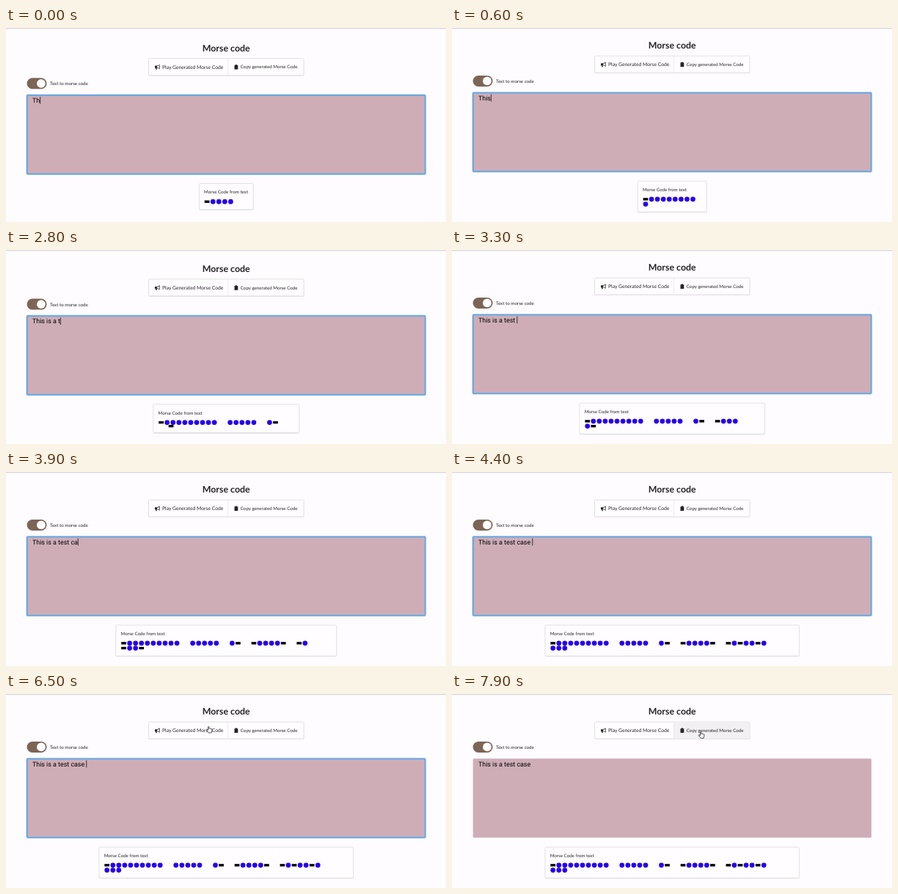
These frames come from a looping animation (600 by 265 pixels, 8 s). An HTML page:

```html
<!DOCTYPE html>
<html lang="en">
<head>
<meta charset="utf-8">
<title>Morse code</title>
<style>
  html, body { margin: 0; width: 100%; height: 100%; overflow: hidden; background: #fefcfe; }
  svg { display: block; width: 600px; height: 265px; }
  text { font: 6.2px Lato, sans-serif; fill: #262326; text-rendering: geometricPrecision; white-space: pre; }
  .title { font-size: 12.4px; font-weight: 700; text-anchor: middle; }
  .play { font-size: 6.77px; }
  #typed { font: 8.9px Roboto, sans-serif; fill: #000; }
  .box { fill: #fffdff; stroke: #dddbdd; stroke-width: .8; }
  .shadow { fill: #d3d1d3; opacity: .6; }
</style>
</head>
<body>
<svg viewBox="0 0 600 265">
  <rect width="600" height="1.3" fill="#d9d7d9"/>
  <g id="page">
    <text class="title" x="300.2" y="31.8">Morse code</text>

    <rect class="shadow" x="194.3" y="42" width="212" height="23.4" rx="1.5"/>
    <rect class="box" x="194.5" y="41.5" width="211.5" height="23" rx="1.4"/>
    <rect id="pressed" x="302.8" y="41.9" width="102.8" height="22.2" fill="#f2f0f2"/>
    <path d="M302.6 41.9v22.2" stroke="#e4e2e4" stroke-width=".7"/>
    <g fill="#262326">
      <path d="M203 51.6h2.6q2.4-.2 4-1.9v6.6q-1.600-1.700-4-1.900h-.3l.7 2.300h-1.500l-.8-2.300h-.7z"/>
      <path d="M206 52.300q1.600-.2 2.800-1.200v3.800q-1.200-1-2.800-1.200z" fill="#fffdff"/>
      <path d="M311.500 50.700h1.300q.2-1 1.100-1t1.100 1h1.300v5.700h-4.800z"/>
    </g>
    <text class="play" x="213" y="55.500">Play Generated Morse Code</text>
    <text x="319.800" y="55.400">Copy generated Morse Code</text>

    <rect x="28.500" y="68.300" width="27" height="15" rx="7.500" fill="#7c6555"/>
    <circle cx="47.900" cy="75.800" r="5.900" fill="#fffdff"/>
    <text x="60" y="78.200">Text to morse code</text>

    <rect x="28.600" y="91.500" width="543.300" height="108.200" rx="1.500" fill="#ceadb7"/>
    <g id="ring" fill="none" stroke="#5da6e4">
      <rect x="28.500" y="91.600" width="543.400" height="108" rx="1.500" stroke-width="2.600" opacity=".4"/>
      <rect x="28.700" y="91.800" width="543" height="107.600" rx="1.200" stroke-width="1.500"/>
    </g>
    <text id="typed" x="36" y="102.100"></text>
    <path id="caret" stroke="#111" stroke-width=".8"/>

    <rect id="cardShadow" class="shadow" y="213" rx="1.500"/>
    <rect id="card" class="box" y="212.500" rx="1.400"/>
    <text id="cardTitle" y="226.200">Morse Code from text</text>
    <g id="code"></g>
  </g>
  <path id="hand" fill="#fff" stroke="#222" stroke-width=".8" stroke-linejoin="round"
    d="M-1.500 1V-3.200q0-.9.700-.9t.7.900v2l.2-.4q.8-.5 1.200.3.900-.5 1.300.3 1-.3 1.200.6v2.200l-.7 2.700h-3.900L-3.500 1.200q-.4-.9.400-1.100z"/>
</svg>
<script>
const LOOP = 8000, CLICK = 6800;
const MESSAGE = 'This is a test case ';
const MORSE = { t: '-', h: '....', i: '..', s: '...', a: '.-', e: '.', c: '-.-.', ' ': ' ' };
// Key press times of every character after the first two
const KEYS = [200, 400, 700, 1000, 2200, 2350, 2500, 2650, 2780, 2900,
              3030, 3150, 3280, 3600, 3800, 3950, 4150, 4300];
// Pointer: [time, x, y]
const PATH = [[6200, 272, 60], [6400, 277, 48.500], [6530, 277, 48.500], [6760, 340, 55.800]];

const DOT = 6.72, DASH = 3.36, STEP = 8.064, GAP = 13.44, PAD = 6.7, MIN_WIDTH = 60.4;
const $ = id => document.getElementById(id);
const set = (id, attrs) => { for (const k in attrs) $(id).setAttribute(k, attrs[k]); };
const show = (id, on) => set(id, { visibility: on ? 'visible' : 'hidden' });
let shown, shift;

// Lays out the signs in rows that may fill 90% of the card
function layout(text) {
  const signs = [...text.toLowerCase()].map(c => MORSE[c]).join('');
  const widthOf = s => s === ' ' ? GAP : STEP;
  const content = Math.max(MIN_WIDTH, [...signs].reduce((sum, s) => sum + widthOf(s), 0));
  const rows = [[]];
  let x = 0;
  for (const s of signs) {
    if (x + widthOf(s) > content * .9) { rows.push([]); x = 0; }
    rows[rows.length - 1].push([s, x]);
    x += widthOf(s);
  }
  const left = 300.300 - content / 2;
  let y = 237.200 - DOT / 2, svg = '';
  for (const row of rows) {
    const h = Math.max(...row.map(([s]) => ({ '.': DOT, '-': DASH, ' ': 0 })[s]));
    const mid = y + h / 2;
    for (const [s, dx] of row) {
      const cx = left + dx + STEP / 2;
      if (s === '.') svg += `<circle cx="${cx}" cy="${mid}" r="${DOT / 2}" fill="#2500f0"/>`;
      if (s === '-') svg += `<rect x="${cx - DOT / 2}" y="${mid - DASH / 2}" width="${DOT}" height="${DASH}"/>`;
    }
    y += h;
  }
  const extra = y - 237.200 - DOT / 2;
  const frame = { x: left - PAD, width: content + 2 * PAD, height: 35.400 + extra };
  set('card', frame);
  set('cardShadow', { ...frame, height: frame.height + .6 });
  set('cardTitle', { x: left });
  $('code').innerHTML = svg;
  shift = -extra / 2;
  set('page', { transform: `translate(0 ${shift})` });
}

function pointerAt(t) {
  const i = PATH.findIndex(p => p[0] > t);
  if (i < 0) return PATH[PATH.length - 1].slice(1);
  const [a, b] = [PATH[i - 1], PATH[i]];
  const k = (t - a[0]) / (b[0] - a[0]), e = k * k * (3 - 2 * k);
  return [a[1] + (b[1] - a[1]) * e, a[2] + (b[2] - a[2]) * e];
}

function draw(t) {
  const pressed = KEYS.filter(k => k <= t);
  const text = MESSAGE.slice(0, 2 + pressed.length);
  if (text !== shown) {
    shown = text;
    $('typed').textContent = text;
    layout(text);
    set('caret', { d: `M${36.400 + $('typed').getComputedTextLength()} 94v9.800` });
  }
  const focused = t < CLICK;
  const lastKey = pressed.length ? pressed[pressed.length - 1] : 0;
  show('caret', focused && (t - lastKey) % 1000 < 500);
  show('ring', focused);
  show('pressed', !focused);
  const moving = t >= PATH[0][0];
  show('hand', moving);
  if (moving) set('hand', { transform: `translate(${pointerAt(t)})` });
}

function tick() {
  draw(performance.now() % LOOP);
  requestAnimationFrame(tick);
}
tick();
</script>
</body>
</html>
```
